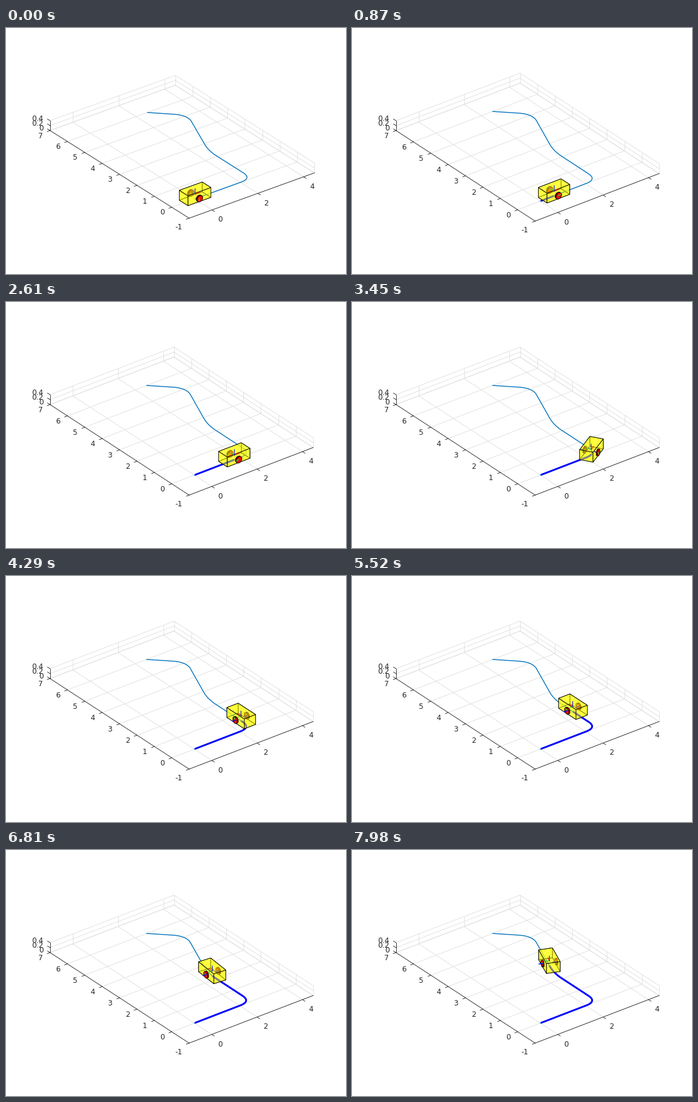
Animation of 570 by 413 pixels, one loop 8000 ms. Source, as a matplotlib script:

```python
import numpy as np
import matplotlib.pyplot as plt
from matplotlib.animation import FuncAnimation

W, H, DPI = 570, 413, 64
PT = 72 / DPI  # points per pixel

plt.rcParams["font.family"] = "DejaVu Sans"
fig = plt.figure(figsize=(W / DPI, H / DPI), dpi=DPI, facecolor="white")
ax = fig.add_axes([0, 0, 1, 1])
ax.set_xlim(0, W)
ax.set_ylim(H, 0)
ax.axis("off")

X0, X1, Y0, Y1, ZMAX = -1, 4.47, -1, 7, 0.4
BOX = np.array([1.0, 0.5, 0.4])
RADIUS, SPEED = 0.125, 0.02
TO_VIEWER = np.array([-0.527, -0.687, 0.5])
INK = (0.15, 0.15, 0.15)


class View:
    """Parallel projection fixed by the front corner and the axis vectors."""

    def __init__(self, corner, ex, ey, ez):
        self.corner = np.array(corner)
        self.axes = np.array([ex, ey, ez])

    def __call__(self, pts):
        return (np.asarray(pts, float) - [X0, Y0, 0]) @ self.axes + self.corner


FIRST = View((307, 319.3), (38.4, -13.9), (-29.15, -18.4), (0, -41.4))
MAIN = View((307, 324.2), (38.0, -14.6), (-29.15, -19.0), (0, -41.5))


def stroke(color, width, z, **kw):
    return ax.plot([], [], color=color, lw=width * PT, zorder=z, **kw)[0]


def axes_box(view):
    """Grid, rulers, ticks and labels for one view."""
    parts = []

    def line(a, b, color=(0.875,) * 3, z=1):
        p = view([a, b])
        item = stroke(color, 0.9, z)
        item.set_data(p[:, 0], p[:, 1])
        parts.append(item)

    def tick(at, away, text, shift, align="center"):
        p = view(at)
        d = np.array(away) @ view.axes
        q = p + 5 * d / np.hypot(*d)
        item = stroke(INK, 0.9, 2)
        item.set_data([p[0], q[0]], [p[1], q[1]])
        label = ax.text(p[0] + shift[0], p[1] + shift[1], text, color=INK,
                        size=12.3 * PT, ha=align, va="center_baseline", zorder=2)
        parts.extend([item, label])

    for x in (0, 2, 4):
        line((x, Y0, 0), (x, Y1, 0))
        line((x, Y1, 0), (x, Y1, ZMAX))
        tick((x, Y0, 0), (0, -1, 0), str(x), (13.8, 15))
    for y in range(Y0, Y1 + 1):
        line((X0, y, 0), (X1, y, 0))
        line((X1, y, 0), (X1, y, ZMAX))
        shift = (-17.5, 14) if y < 0 else (-16, 7.5)
        tick((X0, y, 0), (-1, 0, 0), str(y), shift)
    for z in (0, 0.2, 0.4):
        line((X0, Y1, z), (X1, Y1, z))
        line((X1, Y1, z), (X1, Y0, z))
        tick((X0, Y1, z), (0, 1, 0), f"{z:g}", (-11, -5), "right")
    line((X1, Y0, 0), (X1, Y1, 0))

    front = (X0, Y0, 0)
    line(front, (X1, Y0, 0), INK, 2)
    line(front, (X0, Y1, 0), INK, 2)
    line((X0, Y1, 0), (X0, Y1, ZMAX), INK, 2)
    return parts


def rounded_route(points, cut=0.5, n=60):
    """Polyline whose corners are replaced by quadratic curves."""
    pts = np.array(points, float)
    out, start = [], pts[0]
    t = np.linspace(0, 1, n, endpoint=False)[:, None]
    for a, b, c in zip(pts, pts[1:], pts[2:]):
        enter = b + cut * (a - b) / np.linalg.norm(a - b)
        leave = b + cut * (c - b) / np.linalg.norm(c - b)
        out.append(start + (enter - start) * t)
        out.append((1 - t) ** 2 * enter + 2 * t * (1 - t) * b + t ** 2 * leave)
        start = leave
    out += [start + (pts[-1] - start) * t, pts[-1:]]
    return np.vstack(out)


route = rounded_route([(0, 0), (2.5, 0), (2.5, 2.5), (3.5, 5), (2.5, 6)])
dist = np.r_[0, np.cumsum(np.hypot(*np.diff(route, axis=0).T))]
grad = np.gradient(route, axis=0)
angle = np.unwrap(np.arctan2(grad[:, 1], grad[:, 0]))


def stretch(a, b):
    """Floor points of the route between two distances."""
    s = np.linspace(a, b, max(2, int((b - a) * 60)))
    return np.c_[np.interp(s, dist, route[:, 0]),
                 np.interp(s, dist, route[:, 1]), 0 * s]


def polygon(z, **kw):
    return ax.fill([0, 1, 1], [0, 0, 1], zorder=z, **kw)[0]


# Box faces as (normal, corners) in unit coordinates.
FACES = []
for axis in range(3):
    for side in (-1, 1):
        normal = np.zeros(3)
        normal[axis] = side
        u, v = np.eye(3)[[(axis + 1) % 3, (axis + 2) % 3]]
        corners = [normal + i * u + j * v
                   for i, j in ((-1, -1), (1, -1), (1, 1), (-1, 1))]
        FACES.append((normal, np.array(corners)))

RGB = ("red", "limegreen", "blue")
views = {FIRST: axes_box(FIRST), MAIN: axes_box(MAIN)}
path_line = stroke("#0072BD", 1.4, 3)
trail_line = stroke("blue", 3, 4, solid_capstyle="butt")
inner_path = stroke("#0072BD", 1.4, 6)
inner_trail = stroke("blue", 3, 7, solid_capstyle="butt")
faces = [polygon(5, fc=(1, 1, 0, 0.5), ec="black", lw=0.8 * PT) for _ in FACES]
body_axes = [stroke(c, 1.5, 12, alpha=0.75) for c in RGB]
wheels = [([polygon(8, fc=c, ec="black", lw=0.9 * PT) for c in ("#a00000", "#f01000")],
           [stroke(c, 1.5, 9) for c in RGB]) for _ in range(2)]
ring = np.linspace(0, 2 * np.pi, 25)[:, None]


def put(item, pts):
    item.set_data(pts[:, 0], pts[:, 1])


def draw(k):
    step = (2 * k + 1) // 3  # the pose advances every 30 ms
    view = MAIN if step else FIRST
    for key, parts in views.items():
        for part in parts:
            part.set_visible(key is view)

    s = SPEED * (step + 1)
    put(path_line, view(np.c_[route, np.zeros(len(route))]))
    put(trail_line, view(stretch(SPEED, s)))
    put(inner_path, view(stretch(s, s + 0.5)))
    put(inner_trail, view(stretch(max(SPEED, s - 0.48), s)))

    pos = stretch(s, s)[0]
    a = np.interp(s, dist, angle)
    fwd = np.array([np.cos(a), np.sin(a), 0])
    left = np.array([-np.sin(a), np.cos(a), 0])
    up = np.array([0, 0, 1.0])
    frame = np.array([fwd, left, up])
    mid = pos + up * BOX[2] / 2

    for face, (normal, corners) in zip(faces, FACES):
        face.set_xy(view(mid + (corners * BOX / 2) @ frame))
        face.set_zorder(11 if normal @ frame @ TO_VIEWER > 0 else 5)
    for item, d in zip(body_axes, frame):
        put(item, view([mid, mid + 0.2 * d]))

    roll = SPEED * step / RADIUS
    c, r = np.cos(roll), np.sin(roll)
    spin = (c * fwd - r * up, -r * fwd - c * up, left)
    for side, (discs, arms) in zip((-1, 1), wheels):
        hub = pos + side * left * BOX[1] / 2 + up * RADIUS
        out = left if left @ TO_VIEWER > 0 else -left
        near = side * left @ TO_VIEWER > 0
        base = 13 if near else 8
        rim = RADIUS * (np.cos(ring) * fwd + np.sin(ring) * up)
        for i, disc in enumerate(discs):
            disc.set_xy(view(hub + (0.05 * i - 0.025) * out + rim))
            disc.set_zorder(base + 0.1 * i)
        for arm, d in zip(arms, spin):
            hidden = d is left and out is not left
            put(arm, view([hub, hub + (0.13 if d is left else 0.1) * d]))
            arm.set_zorder(base - 0.1 if hidden else base + 0.5)
    return []


anim = FuncAnimation(fig, draw, frames=400, interval=20, repeat=True,
                     repeat_delay=0, blit=False)
plt.show()
```
